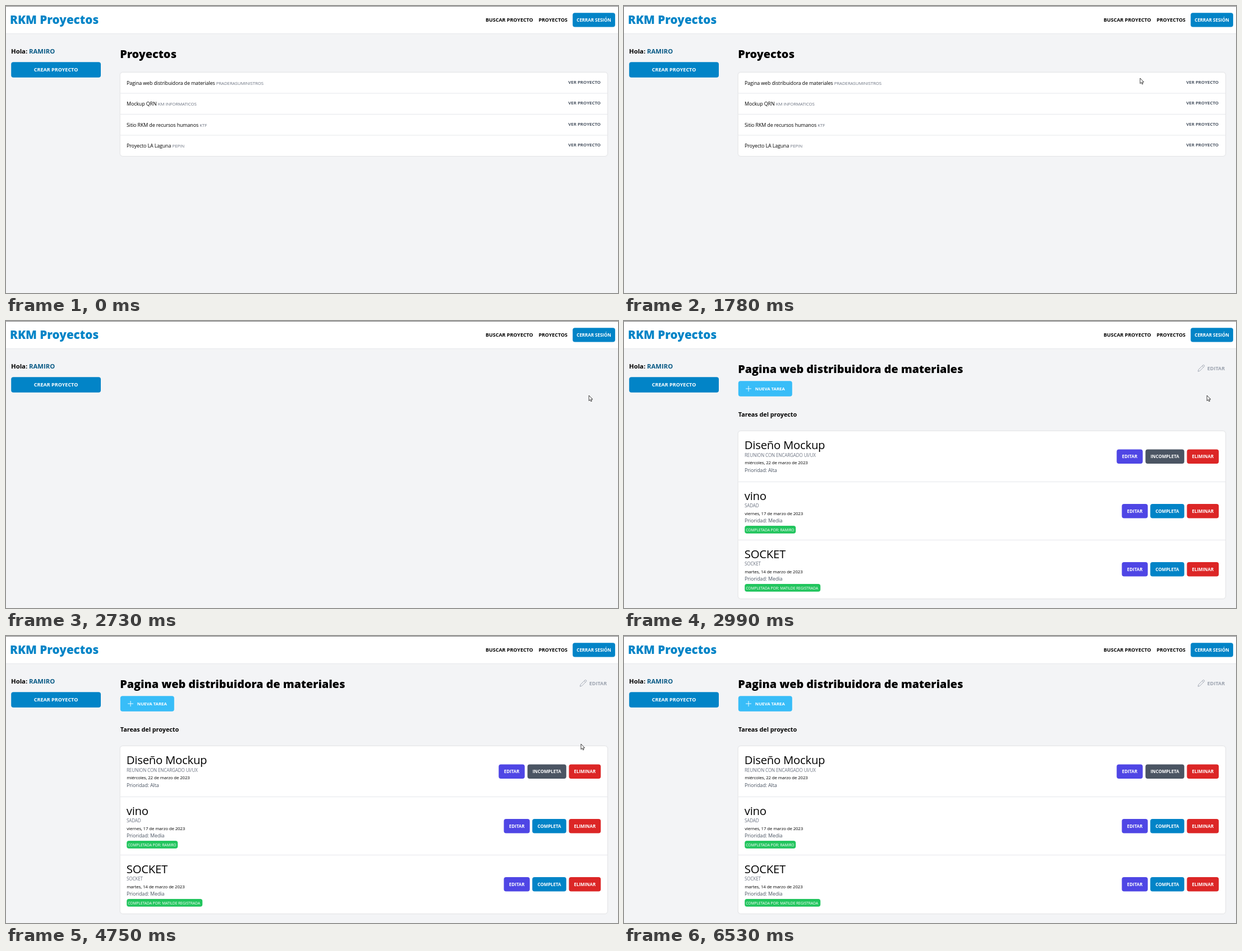
These frames come from a looping animation (1091x513 px, 7.13 s). An HTML page:

```html
<!DOCTYPE html>
<html lang="es">
<head>
<meta charset="utf-8">
<title>Proyectos</title>
<style>
html, body { margin: 0; width: 100%; height: 100%; overflow: hidden; background: #f3f4f6; }
svg { display: block; width: 100%; height: 100%; }
text { font-family: "Open Sans", "Noto Sans", sans-serif; letter-spacing: -.012em; white-space: pre; }
.b { font-weight: 700; letter-spacing: 0; }
.x { font-weight: 800; letter-spacing: 0; }
.card { fill: #fff; filter: drop-shadow(0 .6px .8px rgba(0, 0, 0, .16)); }
.rule { stroke: #e5e7eb; }
.mid { text-anchor: middle; }
</style>
</head>
<body>
<svg id="stage" viewBox="0 0 1091 513"></svg>
<script>
const SKY = '#0284c7', INDIGO = '#4f46e5', SLATE = '#4b5563', RED = '#dc2626', GREEN = '#22c55e', GRAY = '#6b7280';
const LOOP = 7130, STEP = 69, CLICK = 2530, LOADED = 2990;

const text = (x, y, size, str, fill = '#000', cls = '') =>
  `<text x="${x}" y="${y}" font-size="${size}" fill="${fill}" class="${cls}">${str}</text>`;
const rect = (x, y, w, h, fill, r = 4) =>
  `<rect x="${x}" y="${y}" width="${w}" height="${h}" rx="${r}" fill="${fill}"/>`;
const button = (x, y, w, h, label, fill, size = 7.9) =>
  rect(x, y, w, h, fill) + text(x + w / 2, y + h / 2 + size * .36, size, label, '#fff', 'b mid');
const card = (y, h) => `<rect class="card" x="203.8" y="${y}" width="868.2" height="${h}" rx="4.5"/>`;
const rule = y => `<path class="rule" d="M204 ${y}H1072"/>`;

const frame = rect(0, 0, 1091, 49, '#fff', 0)
  + '<path class="rule" d="M0 49.5H1091"/><path stroke="#7b7b7b" d="M0 .5H1091"/>'
  + text(7, 32.2, 20.6, 'RKM Proyectos', SKY, 'x')
  + text(855, 28.2, 8.95, 'BUSCAR PROYECTO', '#000', 'b')
  + text(949.4, 28.2, 8.9, 'PROYECTOS', '#000', 'b')
  + button(1010.2, 12.2, 75.7, 25.3, 'CERRAR SESIÓN', SKY, 7.95)
  + text(9, 85, 11.3, 'Hola: <tspan fill="#075985">RAMIRO</tspan>', '#000', 'b')
  + button(9.2, 100.3, 159.8, 27.5, 'CREAR PROYECTO', SKY, 9);

const projects = [
  ['Pagina web distribuidora de materiales', 'PRADERASUMINISTROS'],
  ['Mockup QRN', 'KM INFORMATICOS'],
  ['Sitio RKM de recursos humanos', 'KTF'],
  ['Proyecto LA Laguna', 'PEPIN'],
];
const list = text(203.2, 92.7, 19.8, 'Proyectos', '#000', 'x') + card(119, 149)
  + projects.map(([name, client], i) => {
    const y = 118.5 + i * 37.5;
    return (i ? rule(y) : '')
      + text(215, y + 22.4, 8.9, `${name} <tspan font-size="7.9" fill="${GRAY}">${client}</tspan>`)
      + text(1002.2, y + 20.3, 7.85, 'VER PROYECTO', SLATE, 'b ver');
  }).join('');

const tasks = [
  [197, 'Diseño Mockup', 'REUNION CON ENCARGADO UI/UX', 'miércoles, 22 de marzo de 2023', 'Alta'],
  [287.5, 'vino', 'SADAD', 'viernes, 17 de marzo de 2023', 'Media', 'RAMIRO', 91],
  [391.5, 'SOCKET', 'SOCKET', 'martes, 14 de marzo de 2023', 'Media', 'MATILDE REGISTRADA', 135],
];
const taskRow = ([y, title, note, date, priority, by, badge]) => {
  const top = y + (by ? 39.6 : 32.6), h = 25.3;
  return (y > 197 ? rule(y) : '')
    + text(214.8, y + 32, 20.3, title)
    + text(215, y + 45.5, 8.03, note, GRAY)
    + text(215.2, y + 59.2, 7.8, date)
    + text(215, y + 72.6, 8.95, 'Prioridad: ' + priority, SLATE)
    + (by ? rect(215.2, y + 78.6, badge, 13.7, GREEN) + text(217.3, y + 88.1, 6.75, 'COMPLETADA POR: ' + by, '#fff')
      + button(887.5, top, 46.2, h, 'EDITAR', INDIGO) + button(938.2, top, 60.6, h, 'COMPLETA', SKY)
      : button(878.3, top, 46.4, h, 'EDITAR', INDIGO) + button(929.6, top, 69.2, h, 'INCOMPLETA', SLATE))
    + button(1003.5, top, 56.8, h, 'ELIMINAR', RED);
};
const detail = text(203.2, 92.7, 19.8, projects[0][0], '#000', 'x')
  + '<path d="M1023.3 90.2L1024.2 86.8L1032 79Q1033.2 78 1034.3 79.1T1034.3 81.4L1026.5 89.2ZM1030.7 80.3L1033 82.6" fill="none" stroke="#9ca3af" stroke-width=".9"/>'
  + text(1039.8, 87.9, 9, 'EDITAR', '#9ca3af', 'b')
  + rect(203.8, 107.2, 96, 27.5, '#38bdf8')
  + '<path d="M217 121H227M222 116V126" stroke="#fff" stroke-width=".9"/>'
  + text(233.8, 123.8, 7.8, 'NUEVA TAREA', '#fff', 'b')
  + text(203.8, 170.8, 10.8, 'Tareas del proyecto', '#000', 'b')
  + card(197, 299) + tasks.map(taskRow).join('');

const stage = document.getElementById('stage');
stage.innerHTML = frame + `<g id="list">${list}</g><g id="detail">${detail}</g>`
  + `<g id="cursor" fill="#fff" stroke="#000" stroke-width=".75" stroke-linejoin="round">
  <path id="arrow" d="M0 0V9.6L2.2 7.6L3.6 10.8L5.2 10.1L3.8 7H6.7Z"/>
  <path id="hand" d="M-1 1Q0-.6 1 1V5.2Q2 4.4 2.7 5.4Q3.8 4.8 4.5 5.8Q6 5.3 6.2 7V10Q6 12 5 13.6H-.2Q-1 11.6-3.2 9Q-3 7.4-1 9Z"/></g>`;
const $ = id => document.getElementById(id);
const show = (el, on) => el.setAttribute('display', on ? 'inline' : 'none');
const firstLink = stage.querySelector('.ver');

// Pointer path: step, x, y
const path = [
  [0, 1046, 505], [3, 1056, 375], [6, 1030, 190], [8, 994, 85], [10, 948, 43],
  [11, 925, 41], [12, 895, 48], [14, 690, 88], [16, 470, 120], [18, 620, 129], [20, 920, 129], [21, 1028, 129],
  [22, 1050, 118], [23, 1065, 110], [25, 1055, 124], [27, 1039, 133], [50, 1039.5, 133],
  [53, 1034.5, 133], [55, 1034.5, 134], [63, 1025, 193], [66, 1026, 216],
  [72, 1019, 290], [74, 1032, 330], [77, 1029.2, 356], [83, 979, 450], [88, 1002, 511],
];
const pointer = k => {
  const i = Math.max(1, path.findIndex(p => p[0] >= k));
  const [a, b] = [path[i - 1], path[i]], f = (k - a[0]) / (b[0] - a[0]);
  return [1, 2].map(n => a[n] + (b[n] - a[n]) * f);
};
const inside = (x, y, l, t, r, b) => x >= l && x <= r && y >= t && y <= b;

function draw(now) {
  const t = now % LOOP, k = Math.floor((t - 380) / STEP);
  const visible = k >= 0 && k <= 88;
  show($('list'), t < CLICK);
  show($('detail'), t >= LOADED);
  show($('cursor'), visible);
  let link = false, hand = false;
  if (visible) {
    const [x, y] = pointer(k);
    link = t < CLICK && inside(x, y, 1002, 130, 1061, 142);
    hand = link || t >= LOADED && [229, 327, 431].some(top => inside(x, y, 938, top, 1060, top + 29.5));
    $('cursor').setAttribute('transform', `translate(${x} ${y})`);
  }
  show($('hand'), hand);
  show($('arrow'), !hand);
  firstLink.setAttribute('fill', link ? '#111827' : SLATE);
}
const start = performance.now();
(function tick() {
  draw(performance.now() - start);
  requestAnimationFrame(tick);
})();
</script>
</body>
</html>
```
